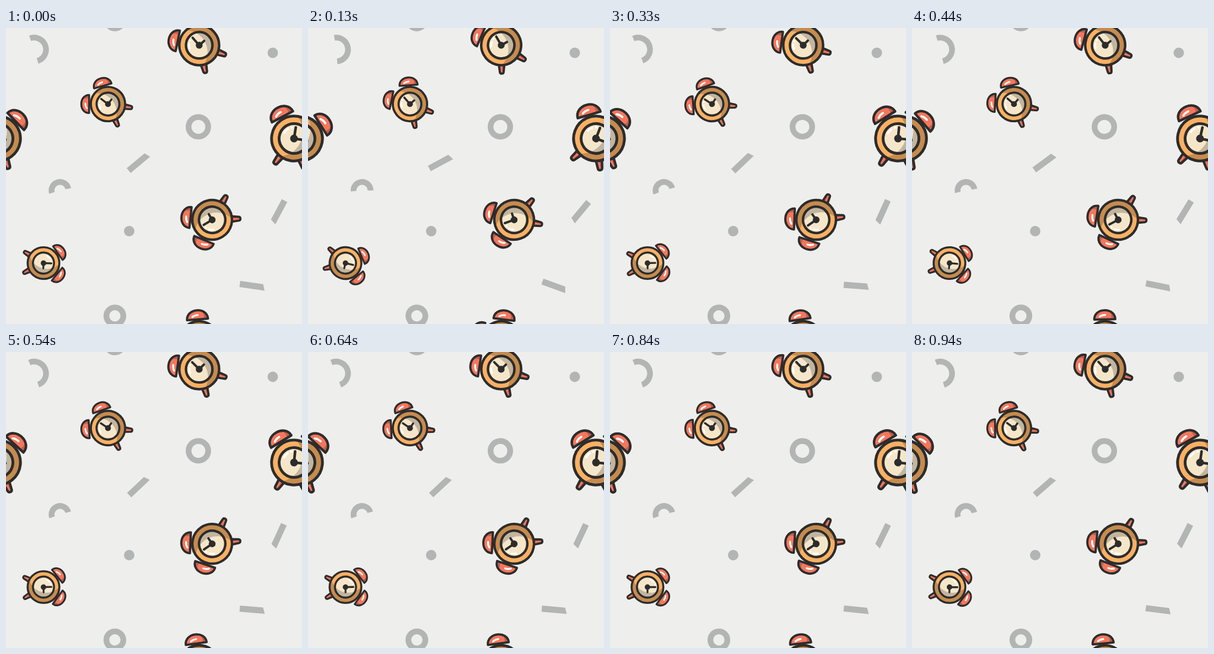
Write an HTML page with a canvas that moves like this. It is 537x537 px and loops after 0.97 s.

```html
<!DOCTYPE html>
<html>
<head>
<meta charset="utf-8">
<style>
html, body { margin: 0; height: 100%; overflow: hidden; background: #eeeeed; }
canvas { display: block; }
</style>
</head>
<body>
<canvas id="stage" width="537" height="537"></canvas>
<script>
const SIZE = 537, LOOP = 970, STEPS = 29;
const INK = '#2c2c2c', GREY = '#b3b5b4', RED = '#f3775d', SHADE = 'rgba(0,0,0,.21)';
const ctx = document.getElementById('stage').getContext('2d');
const rad = deg => deg * Math.PI / 180;

const bell = new Path2D('M-19-39.5C-19-50-10-56 0-56S19-50 19-39.5Z');
const bellShade = new Path2D('M5-56Q15-50 11-39.5H19C19-50 13-55 5-56Z');
const bellGlint = new Path2D('M-9-44.5Q-5-47.5 1-47.5');
const foot = new Path2D('M-5 35L-3.4 48.5Q-3 51.3 0 51.3T3.4 48.5L5 35Z');
const footShade = new Path2D('M1 35V51L3.4 48.5 5 35Z');
const hands = new Path2D('M0 0V-18M0 0H12');
const slab = new Path2D('M-22-5.6H20L24 5.6H-22Z');

function place(x, y, deg, draw, scaleX = 1, scaleY = scaleX) {
  ctx.save();
  ctx.translate(x, y);
  ctx.rotate(rad(deg));
  ctx.scale(scaleX, scaleY);
  draw();
  ctx.restore();
}

function fill(path, color) {
  ctx.fillStyle = color;
  ctx.fill(path);
}

function line(path, color, width) {
  ctx.strokeStyle = color;
  ctx.lineWidth = width;
  ctx.stroke(path);
}

function arc(r, from = 0, to = 360, x = 0) {
  const path = new Path2D();
  path.arc(x, 0, r, rad(from), rad(to));
  return path;
}

function part(path, shade) {
  fill(path, RED);
  fill(shade, SHADE);
  line(path, INK, 4);
}

function drawClock() {
  ctx.lineCap = ctx.lineJoin = 'round';
  for (const side of [-1, 1]) {
    place(0, 0, side * 28.5, () => part(foot, footShade));
    place(0, 0, side * 37, () => {
      part(bell, bellShade);
      line(bellGlint, '#fff', 3.4);
    });
  }
  const body = arc(36), face = arc(23.9);
  fill(body, '#fbb063');
  fill(face, '#f6e6c9');
  line(arc(18, -158, -130), '#fff', 3.2);
  line(arc(18, -112, -109), '#fff', 3.2);
  place(0, 0, 14, () => {
    ctx.clip(body);
    const shadow = arc(40);
    shadow.addPath(arc(40, 0, 360, -28));
    ctx.clip(shadow, 'evenodd');
    fill(body, SHADE);
  });
  line(body, INK, 4.5);
  line(face, INK, 4.5);
  line(hands, INK, 4.2);
  fill(arc(6.2), INK);
}

// Kick, then a short shake: turning points as [step, degrees].
const turns = [[4, 11.8], [10, -3.7], [13, 3.4], [16, -3.3], [4 + STEPS, 11.8]];

function swing(time) {
  let step = Math.floor(time % LOOP / LOOP * STEPS + .2) % STEPS;
  if (step < 4) step += STEPS;
  const next = turns.findIndex(turn => step < turn[0]);
  const [[s0, a0], [s1, a1]] = turns.slice(next - 1, next + 1);
  const u = (step - s0) / (s1 - s0);
  const windUp = .12 * u + .88 * u ** 7;
  const shake = (1 - Math.cos(Math.PI * u)) / 2;
  return a0 + (a1 - a0) * (next === turns.length - 1 ? windUp : shake);
}

function drawTile(angle) {
  const ring = (x, y, r, from, to) => place(x, y, angle, () => {
    ctx.lineCap = 'butt';
    line(arc(r, from, to), GREY, Math.min(10.4, 2 * r));
  });
  const bar = (x, y, rest, flip = 1) =>
    place(x, y, rest + angle, () => fill(slab, GREY), 1, flip);
  const clock = (x, y, scale, rest) => place(x, y, rest + angle, drawClock, scale);

  ring(349, 179.3, 17.8);
  ring(197.5, 522.3, 15.4);
  ring(484, 45, 4.75);
  ring(223.5, 368.5, 4.75);
  ring(51, 39, 21.6, -110, 73);
  ring(98, 294.7, 15.4, 163, 348);

  bar(446, 467.5, 8);
  bar(239.5, 244.5, -40);
  bar(495, 332.5, 118, -1);

  clock(374, 348, 1, 239);
  clock(185, 138, .865, -53);
  clock(350.5, 31.3, 1.005, -41.5);
  clock(68, 426.5, .8, 92);
  clock(522.5, 200.5, 1.13, 9);
}

const start = performance.now();
function frame() {
  const angle = swing(performance.now() - start);
  ctx.fillStyle = '#eeeeed';
  ctx.fillRect(0, 0, SIZE, SIZE);
  for (const dx of [-SIZE, 0])
    for (const dy of [-SIZE, 0, SIZE])
      place(dx, dy, 0, () => drawTile(angle));
  requestAnimationFrame(frame);
}
frame();
</script>
</body>
</html>
```
